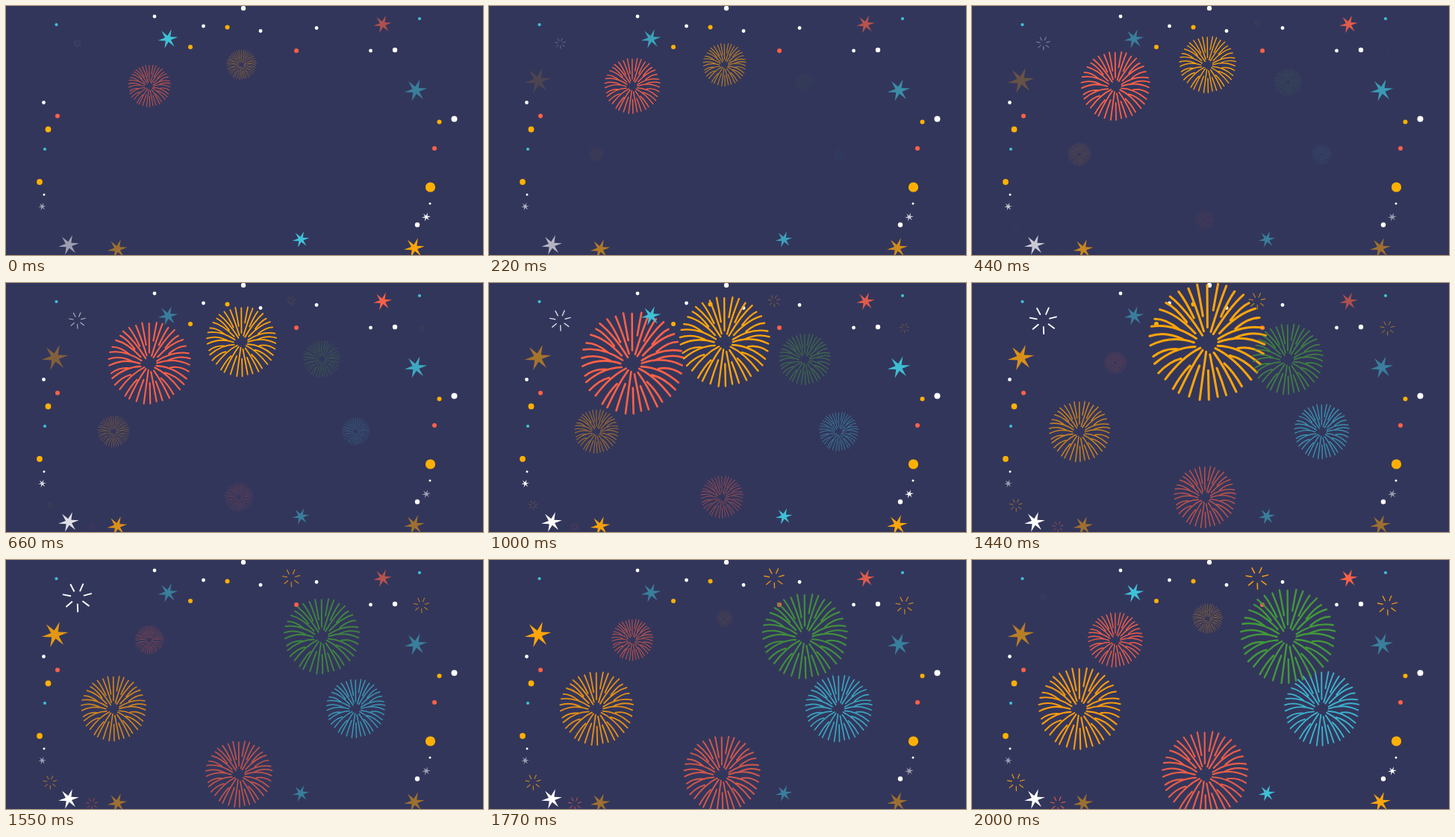
Animation of 639 by 334 pixels, one loop 2110 ms. Source, as an HTML page with a canvas:

```html
<!DOCTYPE html>
<html lang="en">
<head>
<meta charset="utf-8">
<title>Fireworks</title>
<style>
  html, body { margin: 0; width: 100%; height: 100%; overflow: hidden; background: #33365b; }
  canvas { display: block; width: 639px; height: 334px; }
</style>
</head>
<body>
<canvas id="sky" width="639" height="334"></canvas>
<script>
const ctx = document.getElementById('sky').getContext('2d');
const LOOP = 2110, STEPS = 19, TAU = Math.PI * 2;
const WHITE = '#fff', GOLD = '#ffb000', AMBER = '#ffa50a', RED = '#ff6147', TEAL = '#3fc1d6';

// Opacity rules, by step
const blink = s => .52 + .48 * Math.max(0, 1 - s % 9 / 4);
const swell = s => .52 + (s < 10 ? .05 * s : 0);
const pulse = s => .8 + .2 * Math.cos((s - 6.5) * TAU / 12);
const rise = s => Math.min(1, .52 + .053 * s);
const dawn = s => s < 17 ? s / 16 : .65;

// colour, radius, then the centres
const dots = [
  [WHITE, 1.5, [51, 253], [568, 265]],
  [WHITE, 2.4, [199, 14], [264.5, 27], [341, 33.5], [416, 29.5], [488.5, 60], [50.5, 129.5]],
  [WHITE, 3.2, [318, 3], [521, 59], [551, 293.5]],
  [WHITE, 4, [600.5, 151.5]],
  [GOLD, 3, [247, 55], [296.5, 28.5], [580.5, 155.5]],
  [GOLD, 3.9, [56.5, 165.5], [45, 236]],
  [GOLD, 6.6, [568.5, 243]],
  [RED, 3, [389, 60], [69, 147.5], [574, 191]],
  [TEAL, 2.1, [67.5, 25], [554, 17], [52, 192]]
];

// x, y, radius, colour, opacity rule
const stars = [
  [217, 44, 13.5, TEAL, blink],
  [395, 313, 11.5, TEAL, blink],
  [547, 324.5, 14, AMBER, blink],
  [563, 283, 6, WHITE, blink],
  [549, 113, 15.5, TEAL, swell],
  [149, 326, 13.5, AMBER, swell],
  [48.5, 269, 5.5, WHITE, swell],
  [504.5, 24.5, 12.5, RED, pulse],
  [65.5, 100, 18, AMBER, dawn],
  [84, 320.5, 14, WHITE, rise]
];

// grow: px per step; start, period, fade: in steps
const blooms = [
  { x: 192, y: 107, color: RED, grow: 4.5, start: -6.35, period: 16.1, fade: 8 },
  { x: 315.5, y: 78.5, color: AMBER, grow: 4.55, start: -4.4, period: 18, fade: 8 },
  { x: 144, y: 199, color: '#ff9d0c', grow: 2.86, start: -1.4 },
  { x: 468.5, y: 199, color: '#3db9d4', grow: 2.67, start: -.9 },
  { x: 312, y: 287, color: RED, grow: 3.25, start: .15 },
  { x: 423, y: 102, color: '#439a3a', grow: 3.25, start: -1.7 }
];
const bursts = [
  { x: 95.5, y: 50, color: WHITE, grow: 1.04, start: -4.8, period: 19.1, fade: 16 },
  { x: 382, y: 24, color: AMBER, grow: .8, start: -1.2 },
  { x: 556.5, y: 60.5, color: AMBER, grow: .78, start: .5 },
  { x: 59, y: 298, color: AMBER, grow: .66, start: 0 },
  { x: 115, y: 327, color: RED, grow: .57, start: 0 }
];

let seed = 11;
const rand = () => (seed = seed * 16807 % 2147483647) / 2147483647;
const polar = (angle, r) => [r * Math.cos(angle), r * Math.sin(angle)];

// Unit firework: long and short rays that droop towards the sides
const bloomPath = new Path2D();
for (let i = 0; i < 38; i++) {
  const angle = (i + .3 + rand() * .3) * TAU / 38;
  const inner = (i % 2 ? .42 : .13) + rand() * .12;
  const [mx, my] = polar(angle, (inner + 1) / 2);
  const lift = .2 * Math.abs(Math.cos(angle)) * (1 - inner);
  bloomPath.moveTo(...polar(angle, inner));
  bloomPath.quadraticCurveTo(mx, my - lift, ...polar(angle, .95 + rand() * .05));
}

const burstPath = new Path2D();
for (let i = 0; i < 7; i++) {
  const angle = i * TAU / 7 - .26;
  burstPath.moveTo(...polar(angle, .48));
  burstPath.lineTo(...polar(angle, .98));
}

const starPath = new Path2D();
for (let i = 0; i < 12; i++) {
  starPath.lineTo(...polar(i * TAU / 12 - .17, i % 2 ? .31 : 1));
}
starPath.closePath();

function place(x, y, size, color, alpha, paint) {
  ctx.save();
  ctx.translate(x, y);
  ctx.scale(size, size);
  ctx.globalAlpha = alpha;
  ctx.fillStyle = ctx.strokeStyle = color;
  ctx.lineCap = 'round';
  paint();
  ctx.restore();
}

function drawGrowing({ x, y, color, grow, start, period = 30, fade = 19 }, step, path, width) {
  const age = (step - start) % period;
  if (age <= 0) return;
  const alpha = Math.max(0, Math.min(1, (age - 1) / fade));
  place(x, y, age * grow, color, alpha, () => {
    ctx.lineWidth = width;
    ctx.stroke(path);
  });
}

// Each step lasts 110 ms; two of them last 10 ms longer
const startOf = i => i * 110 + (i > 8 ? 10 : 0) + (i > 17 ? 10 : 0);

function stepAt(time) {
  let i = STEPS - 1;
  while (startOf(i) > time) i--;
  return i;
}

function draw(step) {
  ctx.fillStyle = '#33365b';
  ctx.fillRect(0, 0, 639, 334);
  for (const [color, r, ...centres] of dots) {
    ctx.fillStyle = color;
    for (const [x, y] of centres) {
      ctx.beginPath();
      ctx.arc(x, y, r, 0, TAU);
      ctx.fill();
    }
  }
  for (const b of blooms) drawGrowing(b, step, bloomPath, .038);
  for (const b of bursts) drawGrowing(b, step, burstPath, .1);
  for (const [x, y, r, color, glow] of stars) {
    place(x, y, r, color, glow(step), () => ctx.fill(starPath));
  }
}

function tick() {
  draw(stepAt(performance.now() % LOOP));
  requestAnimationFrame(tick);
}
tick();
</script>
</body>
</html>
```
